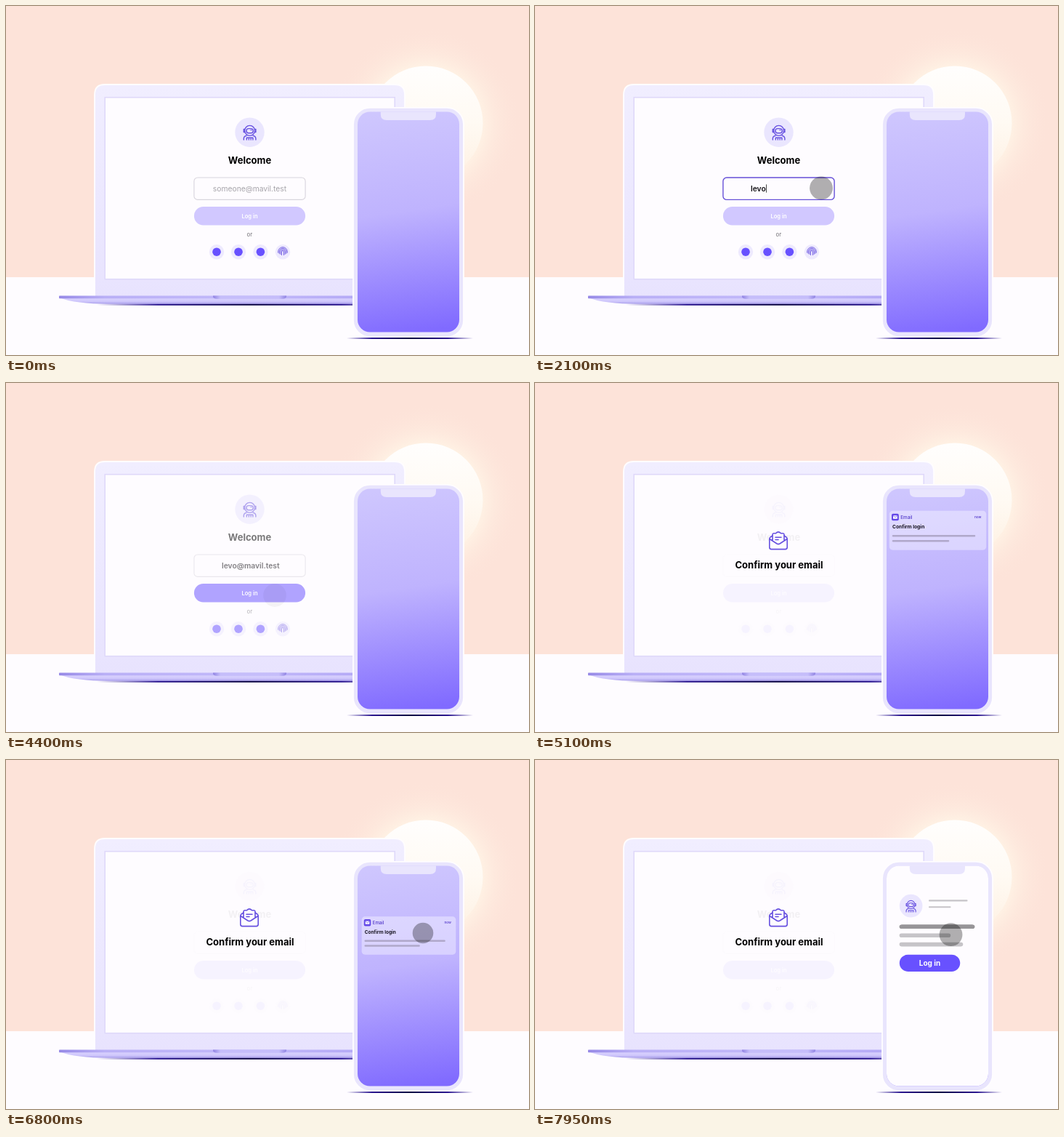
These frames come from a looping animation (720x480 px, 8 s). An HTML page:

```html
<!DOCTYPE html>
<html lang="en">
<head>
<meta charset="utf-8">
<title>Email login</title>
<style>
  html, body { margin: 0; width: 100%; height: 100%; overflow: hidden; background: #fefcff; }
  svg { display: block; width: 720px; height: 480px; font-family: Inter, "Open Sans", sans-serif; }
  .mid { text-anchor: middle; }
  .bold { font-weight: 700; }
  .semi { font-weight: 600; }
  .line { fill: none; stroke: #6650e0; stroke-width: 1.4; stroke-linecap: round; stroke-linejoin: round; }
</style>
</head>
<body>
<svg viewBox="0 0 720 480">
  <defs>
    <radialGradient id="glow">
      <stop offset=".55" stop-color="#fff4e6"/>
      <stop offset=".72" stop-color="#feebdf" stop-opacity=".75"/>
      <stop offset="1" stop-color="#fde3d9" stop-opacity="0"/>
    </radialGradient>
    <linearGradient id="sun" x2="0" y2="1">
      <stop stop-color="#fffefd"/><stop offset=".5" stop-color="#fffaf3"/><stop offset="1" stop-color="#fef0e2"/>
    </linearGradient>
    <linearGradient id="lid" x2="0" y2="1">
      <stop stop-color="#f1eeff"/><stop offset="1" stop-color="#e8e3fe"/>
    </linearGradient>
    <linearGradient id="deck">
      <stop stop-color="#9689e6"/><stop offset=".12" stop-color="#b9aff6"/>
      <stop offset=".5" stop-color="#c2b9fa"/><stop offset="1" stop-color="#a99df2"/>
    </linearGradient>
    <linearGradient id="under" x2="0" y2="1">
      <stop stop-color="#d9d2fd"/><stop offset=".6" stop-color="#d0c8fc"/><stop offset="1" stop-color="#a99eec"/>
    </linearGradient>
    <linearGradient id="hinge">
      <stop stop-color="#9083e2"/><stop offset=".1" stop-color="#c5bdfa"/>
      <stop offset=".9" stop-color="#c5bdfa"/><stop offset="1" stop-color="#9083e2"/>
    </linearGradient>
    <linearGradient id="shade">
      <stop stop-color="#2a1690" stop-opacity="0"/><stop offset=".2" stop-color="#2a1690"/>
      <stop offset=".5" stop-color="#0a0440"/><stop offset=".8" stop-color="#2a1690"/>
      <stop offset="1" stop-color="#2a1690" stop-opacity="0"/>
    </linearGradient>
    <linearGradient id="wall" gradientUnits="userSpaceOnUse" x1="532" y1="146" x2="576" y2="448">
      <stop stop-color="#cec6fe"/><stop offset=".45" stop-color="#bfb3fe"/><stop offset="1" stop-color="#806aff"/>
    </linearGradient>
    <clipPath id="screen"><rect x="484" y="145.5" width="140" height="303" rx="17"/></clipPath>
    <g id="astronaut" class="line">
      <circle cy="-2.6" r="7"/>
      <rect x="-4.7" y="-5.4" width="9.4" height="6.2" rx="3.1"/>
      <path d="M-7-4.5h-1.3v4H-7M7-4.5h1.3v4H7M-8.3 10V8.5Q-8.3 5.2-4.5 4.2M8.3 10V8.5Q8.3 5.2 4.5 4.2M-4.3 10V7.3H4.3V10M-1.3 10V8.8M1.5 10V8.8M1.5-3.4h.8"/>
    </g>
  </defs>

  <rect width="720" height="480" fill="#fde3d9"/>
  <circle cx="578" cy="161" r="132" fill="url(#glow)"/>
  <circle cx="578" cy="161" r="78.5" fill="url(#sun)"/>
  <rect y="373" width="720" height="107" fill="#fefcff"/>

  <path d="M122 400V122Q122 108 136 108H535Q549 108 549 122V400Z" fill="url(#lid)" stroke="#fffdff" stroke-width="1.8"/>
  <rect x="136.2" y="125.7" width="399" height="250" fill="#fefcff" stroke="#dfd9fa" stroke-width="1.6"/>
  <rect x="125" y="409.3" width="421" height="2.5" fill="url(#shade)"/>
  <path d="M73 401C88 407 112 409.7 140 409.7H531C559 409.7 583 407 598 401Z" fill="url(#under)"/>
  <rect x="73" y="398.6" width="525" height="3.6" rx=".8" fill="url(#deck)"/>
  <path d="M285 398.6H386V400Q385 402.8 381 402.8H290Q286 402.8 285 400Z" fill="url(#hinge)"/>

  <g id="form">
    <circle cx="335.5" cy="173.7" r="20.2" fill="#eae6fe"/>
    <use href="#astronaut" transform="translate(335.6 174)"/>
    <text class="mid bold" x="335.5" y="217.2" font-size="13">Welcome</text>
    <rect id="field" x="258.9" y="236" width="153.2" height="30.4" rx="5" fill="#fefcff"/>
    <text id="hint" class="mid" x="335.5" y="254.6" font-size="10.3" fill="#a6a4aa">someone@mavil.test</text>
    <text id="typed" class="semi" x="297" y="254.9" font-size="10.3" fill="#141216"></text>
    <rect id="caret" y="245.4" width=".9" height="11.2" fill="#333"/>
    <rect id="button" x="258.9" y="276" width="153.2" height="25.4" rx="12.7" fill="#6851ff"/>
    <text class="mid semi" x="335.5" y="291.6" font-size="7.6" fill="#fff">Log in</text>
    <text class="mid" x="335.3" y="317.4" font-size="7.8" fill="#77757b">or</text>
    <g id="options"></g>
  </g>

  <g id="confirm">
    <path class="line" style="fill:#fefcff;stroke-width:1.6" d="M327 210V208.5Q327 206.8 328.6 206.8H331.5Q335 203 338.5 206.8H341.4Q343 206.8 343 208.5V210L346 212Q347.2 213 347.2 214.5V226Q347.2 228.6 344.6 228.6H325.4Q322.8 228.6 322.8 226V214.5Q322.8 213 324 212Z"/>
    <path class="line" style="stroke-width:1.6" d="M327 210V217M343 210V217M323 214.5L333 221Q335 222.2 337 221L347 214.5M331 212.2H339M331 215.5H335"/>
    <text class="mid bold" x="336" y="255" font-size="13">Confirm your email</text>
  </g>

  <rect x="469" y="456" width="174" height="2" fill="url(#shade)"/>
  <rect x="478" y="139.8" width="152" height="315.4" rx="23" fill="#e9e5fd" stroke="#fffdff" stroke-width="1.8"/>
  <g clip-path="url(#screen)">
    <rect x="484" y="145" width="140" height="304" fill="url(#wall)"/>
    <g id="notice">
      <rect x="487.8" y="214.6" width="133.4" height="53.8" rx="4.5" fill="#fff" fill-opacity=".38"/>
      <rect x="491" y="218.4" width="9.8" height="9.6" rx="2" fill="#6448e8"/>
      <path d="M493 221h5.8v4.4H493Z" fill="#fff"/>
      <path d="M493 221.2l2.9 2.2 2.9-2.2" fill="none" stroke="#6448e8" stroke-width=".7"/>
      <text x="503.3" y="225.6" font-size="6.3" font-weight="500" fill="#5137c9">Email</text>
      <text x="614.6" y="225" font-size="4.8" font-weight="500" text-anchor="end" fill="#5137c9">now</text>
      <text class="bold" x="492" y="238.8" font-size="6.7" fill="#17131f">Confirm login</text>
      <path d="M493 249H605M493 256H569" stroke="#b0a8ca" stroke-width="2.6" stroke-linecap="round"/>
    </g>
    <rect id="sheet" x="484" y="145" width="140" height="304" fill="#fefcff"/>
    <g id="app" stroke-linecap="round">
      <circle cx="517.6" cy="200.6" r="15.8" fill="#eae6fe"/>
      <use href="#astronaut" transform="translate(517.6 201) scale(.79)"/>
      <path d="M543 193.4H594.5M543 202.3H571.5" stroke="#c6c4c8" stroke-width="2.1"/>
      <path d="M504.4 229.2H602.6" stroke="#979598" stroke-width="5.6" stroke-linecap="butt"/>
      <path d="M504.4 229.2H602.6" stroke="#979598" stroke-width="5.6"/>
      <path d="M504.4 241.3H569.4M504.4 253.6H586.5" stroke="#c6c4c8" stroke-width="5.6"/>
      <rect x="501.8" y="267.7" width="83.4" height="23.2" rx="11.6" fill="#6851ff"/>
      <text class="mid bold" x="543.5" y="282.7" font-size="10" fill="#fff">Log in</text>
    </g>
    <path d="M515.8 145H592V149Q592 157 584 157H524Q515.8 157 515.8 149Z" fill="#e9e5fd"/>
  </g>

  <circle id="cursor" r="15.9"/>
</svg>

<script>
const LOOP = 8000;
const ADDRESS = 'levo@mavil.test';
const PURPLE = '#6650d8';
const el = Object.fromEntries([...document.querySelectorAll('svg [id]')].map(n => [n.id, n]));

// Eased value from [time, value] steps.
function track(t, steps) {
  let [t0, v0] = steps[0];
  for (const [t1, v1] of steps) {
    if (t < t1) {
      const p = Math.max(0, (t - t0) / (t1 - t0));
      return v0 + (v1 - v0) * p * p * (3 - 2 * p);
    }
    t0 = t1;
    v0 = v1;
  }
  return v0;
}

const TRACKS = {
  x: [[100, 380], [700, 394], [3350, 394], [3850, 370], [5000, 370], [5001, 560], [5950, 560], [6500, 574], [7880, 574], [8400, 545]],
  y: [[100, 314], [700, 250.5], [3350, 250.5], [3850, 292], [5000, 292], [5001, 302.5], [5950, 302.5], [6500, 238], [7880, 238], [8400, 280]],
  alpha: [[100, 0], [350, .31], [4230, .31], [4450, 0], [5710, 0], [5930, .31]],
  press: [[700, 1], [780, .9], [900, 1], [3900, 1], [4000, .9], [4150, .9], [4250, 1], [6580, 1], [6700, .9], [6820, .9], [6950, 1]],
  button: [[3320, .3], [3500, 1]],
  form: [[4250, 1], [4550, .045]],
  confirm: [[4550, 0], [4850, 1]],
  drop: [[4750, -130], [5300, 0]],
  notice: [[6580, 1], [6700, .972], [6820, .972], [6950, 1]],
  sheet: [[6880, 0], [7200, 1]],
  app: [[7150, 0], [7450, 1]]
};

function set(node, attrs) {
  for (const name in attrs) node.setAttribute(name, attrs[name]);
}

function buildOptions() {
  const discs = [290, 320, 350.4, 381].map((x, i) =>
    `<circle cx="${x}" cy="338.2" r="10.2" fill="#eeeafe"/>` +
    (i < 3 ? `<circle cx="${x}" cy="338.2" r="5.8" fill="#6851ff"/>` : ''));
  const ridges = [1.5, 3.2, 4.8, 6.3].map((r, i) => {
    const drop = 4.5 - i * 1.1;
    return `<path class="line" style="stroke-width:.9" d="M${381 - r} ${338 + drop}v${-drop}a${r} ${r} 0 0 1 ${2 * r} 0v${drop}"/>`;
  });
  el.options.innerHTML = discs.join('') + ridges.join('');
}

function draw(t) {
  const v = {};
  for (const name in TRACKS) v[name] = track(t, TRACKS[name]);

  set(el.cursor, { transform: `translate(${v.x} ${v.y}) scale(${v.press})`, 'fill-opacity': v.alpha });

  const focused = t >= 800 && t < 4000;
  set(el.field, { stroke: focused ? PURPLE : '#d8d5dd', 'stroke-width': focused ? 1.4 : 1.1 });
  set(el.hint, { opacity: t < 800 ? 1 : 0 });

  const count = Math.min(ADDRESS.length, Math.max(0, Math.floor((t - 1650) / 100)));
  const text = ADDRESS.slice(0, count);
  if (el.typed.textContent !== text) el.typed.textContent = text;
  const blinkOff = t >= 1250 && t < 1550;
  set(el.caret, {
    x: count ? 297.3 + el.typed.getComputedTextLength() : 293.2,
    opacity: focused && !blinkOff ? 1 : 0
  });

  set(el.button, { 'fill-opacity': v.button });
  for (const name of ['form', 'confirm', 'sheet', 'app']) set(el[name], { opacity: v[name] });
  set(el.notice, {
    transform: `translate(0 ${v.drop}) translate(554.5 241.5) scale(${v.notice}) translate(-554.5 -241.5)`
  });
}

buildOptions();
const start = performance.now();
function tick() {
  draw((performance.now() - start) % LOOP);
  requestAnimationFrame(tick);
}
tick();
</script>
</body>
</html>
```
